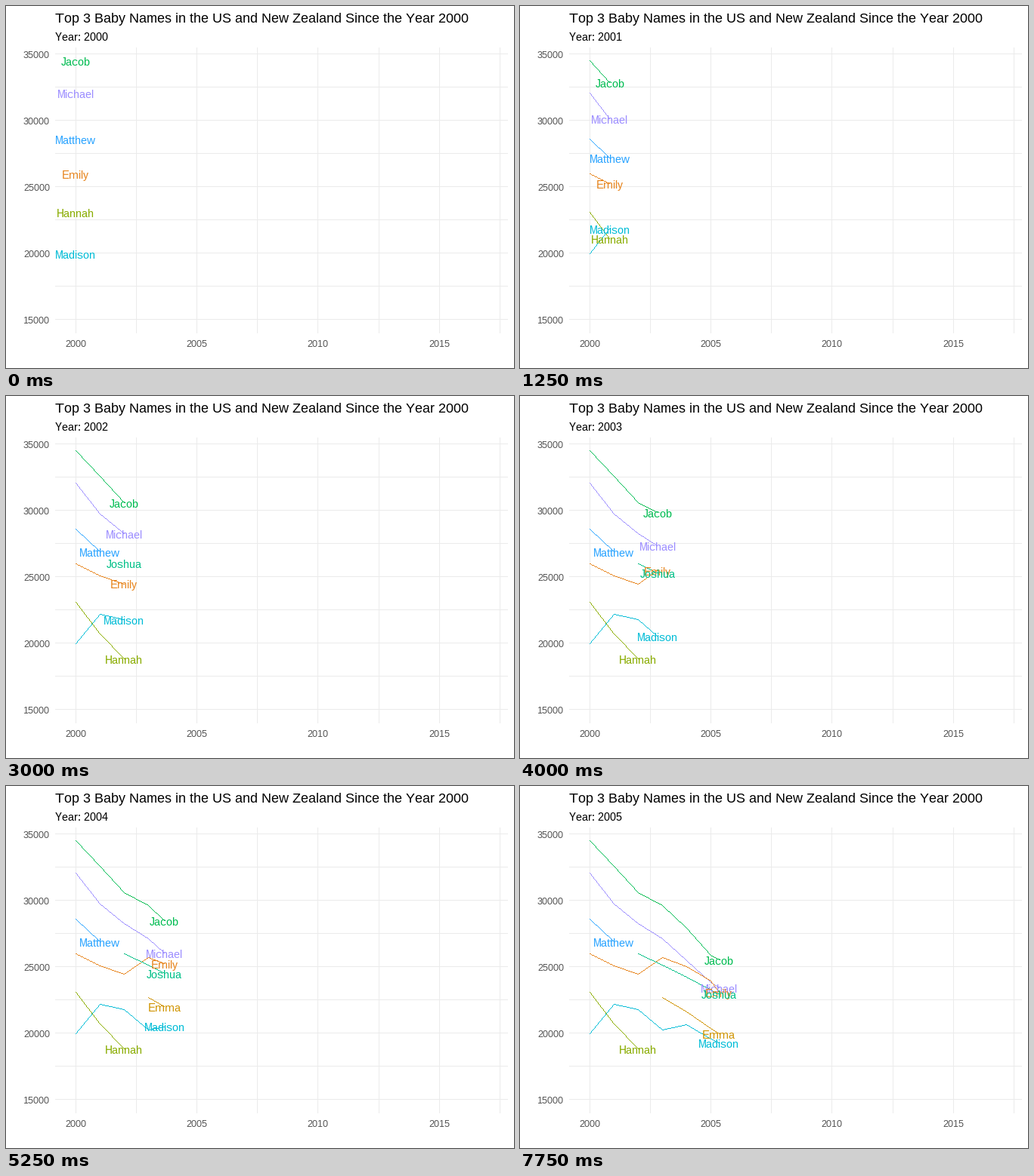
These frames come from a looping animation (672 px wide and 480 px high, 8 s). A matplotlib script:

```python
import matplotlib.pyplot as plt
import numpy as np
from matplotlib.animation import FuncAnimation
from matplotlib.colors import to_rgb

plt.rcParams.update({
    "font.family": "Liberation Sans",
    "text.hinting": "native",
    "text.hinting_factor": 1,
    "text.kerning_factor": 6,
})

W, H, DPI = 672, 480, 96
FRAMES, INTERVAL = 32, 250
STEP = 17 / 99  # years per frame
PX = 72 / DPI   # points per pixel
KEYS = np.round(np.arange(7) * 99 / 17)  # frame at which each year is reached

# name: (colour, first year after 2000, yearly counts), in order of entry
SERIES = {
    "Jacob": ("#00BC51", 0, [34471, 32541, 30568, 29630, 27879, 25830, 24841]),
    "Michael": ("#9C8DFF", 0, [32035, 29720, 28246, 27118, 25454, 23812, 22632]),
    "Matthew": ("#29A3FF", 0, [28572, 26862]),
    "Emily": ("#E7851E", 0, [25953, 25055, 24463, 25688, 25033, 23937, 21400]),
    "Hannah": ("#89AC00", 0, [23080, 20713, 18819]),
    "Madison": ("#00BCD6", 0, [19967, 22164, 21773, 20220, 20618, 19566, 18612]),
    "Joshua": ("#00C087", 2, [25998, 25118, 24196, 23247, 22300]),
    "Emma": ("#D09400", 3, [22704, 21600, 20339, 19108]),
}


def x_px(year):
    return 92.1 + 32.08 * year


def y_px(count):
    return 63.6 + (35000 - count) * 0.0176


def stroke(canvas, xs, ys, color):
    """Draw a one-pixel polyline without smoothing."""
    pts = np.column_stack([xs, ys]).astype(int)
    for a, b in zip(pts[:-1], pts[1:]):
        n = np.abs(b - a).max() + 1
        cols, rows = np.rint(np.linspace(a, b, n)).astype(int).T
        canvas[rows, cols] = to_rgb(color)


fig = plt.figure(figsize=(W / DPI, H / DPI), dpi=DPI, facecolor="white")
ax = fig.add_axes([0, 0, 1, 1])
ax.axis("off")


def text(x, y, s, size, color, ha="left"):
    return ax.text(x, y, s, fontsize=size * PX, color=color, ha=ha,
                   va="baseline")


# Grid and tick labels
grid = np.ones((H, W, 3))
for i in range(9):
    count = 35000 - 2500 * i
    y = int(y_px(count))
    stroke(grid, [65, 663], [y, y], "#EBEBEB")
    if i % 2 == 0:
        text(23, y + 6, str(count), 12, "#4D4D4D")
for i in range(8):
    x = int(x_px(2.5 * i))
    stroke(grid, [x, x], [55, 433], "#EBEBEB")
    if i % 2 == 0:
        text(x - 14, 452, str(2000 + 5 * i // 2), 12, "#4D4D4D")

plot = ax.imshow(grid, extent=(0, W, H, 0), aspect="auto",
                 interpolation="nearest")
ax.set_xlim(0, W)
ax.set_ylim(H, 0)

text(65, 22, "Top 3 Baby Names in the US and New Zealand Since the Year 2000",
     18, "black")
subtitle = text(65, 46, "", 15, "black")
labels = {n: text(0, 0, n, 15, c, "center") for n, (c, _, _) in SERIES.items()}


def draw(frame):
    now = np.interp(frame, KEYS, np.arange(7))
    subtitle.set_text(f"Year: {2000 + round(frame * STEP)}")
    canvas = grid.copy()
    for name, (color, start, counts) in SERIES.items():
        label = labels[name]
        label.set_visible(now >= start)
        if now < start:
            continue
        years = start + np.arange(len(counts))
        head = min(now, years[-1])
        xs = np.append(years[years < head], head)
        ys = y_px(np.interp(xs, years, counts))
        stroke(canvas, x_px(xs), ys, color)
        label.set_position((x_px(head), np.round(ys[-1] + 6.4)))
    plot.set_data(canvas)
    return [plot, subtitle, *labels.values()]


anim = FuncAnimation(fig, draw, frames=FRAMES, interval=INTERVAL,
                     repeat=True, repeat_delay=0, blit=False)
plt.show()
```
